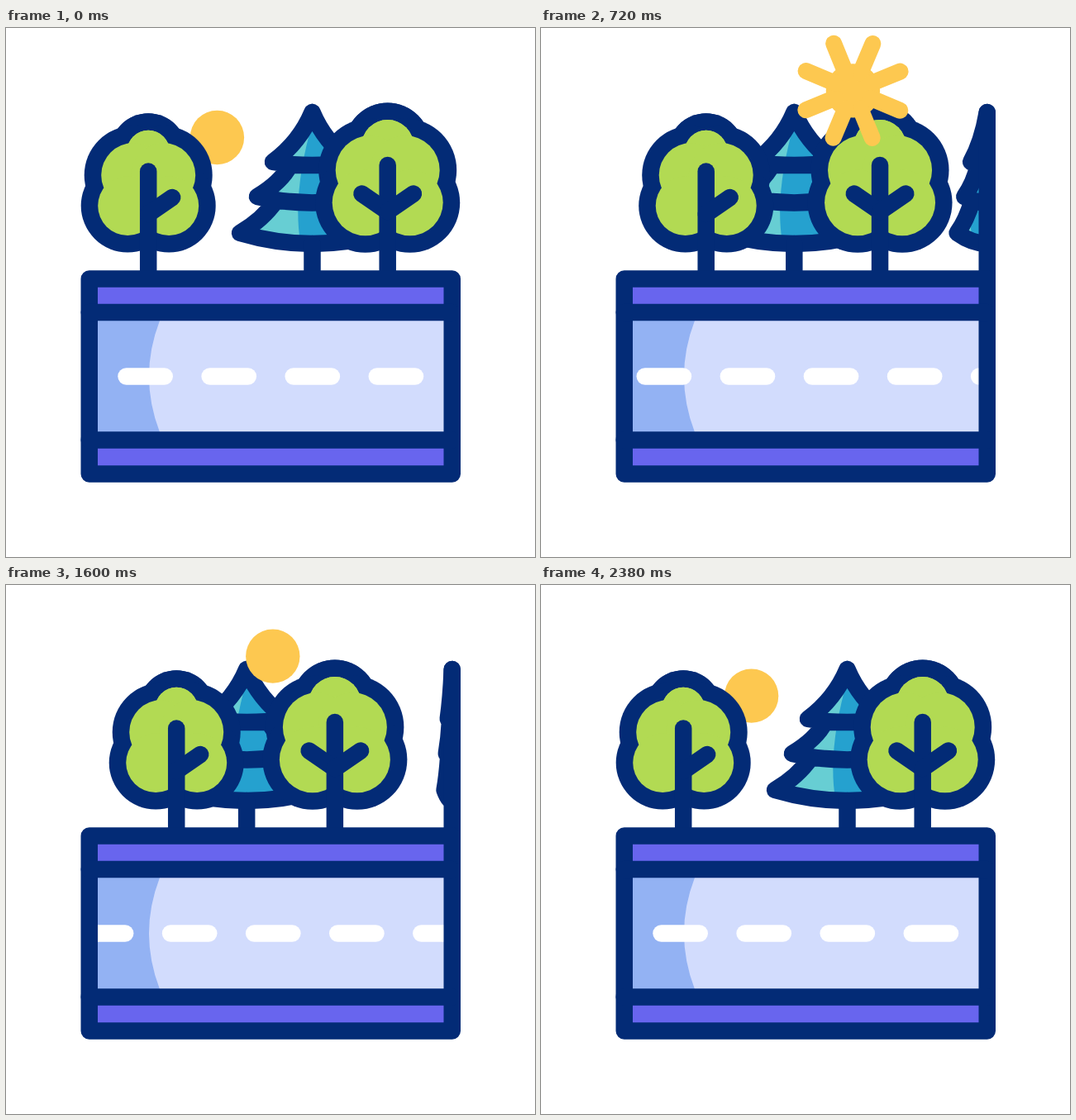
An HTML page with a canvas for the animation above (2.7 s loop, 640 px wide and 640 px high).

```html
<!DOCTYPE html>
<html lang="en">
<head>
<meta charset="utf-8">
<title>Road with trees</title>
<style>
  html, body { margin: 0; width: 100%; height: 100%; overflow: hidden; background: #fff; }
  canvas { display: block; width: 100vw; height: 100vh; }
</style>
</head>
<body>
<canvas id="stage" width="640" height="640"></canvas>
<script>
const ctx = document.getElementById('stage').getContext('2d');
const LOOP = 2700, MOVING = 2400, LINE = 20.5, BASE = 303.5;
const NAVY = '#032b76', GREEN = '#b2da53', SUN = '#fdc850', VIOLET = '#6865ee';
const TEAL = '#67ced3', BLUE = '#25a1cf', ROAD = '#d2dcfd', SHADE = '#93b2f3';

function ease(t, start, end) {
  const s = Math.min(1, Math.max(0, (t - start) / (end - start)));
  return s * s * (3 - 2 * s);
}
// Rises from 0 to 1, holds, then falls back to 0.
const swing = (t, a, b, c, d) => ease(t, a, b) - ease(t, c, d);

function stroke(color, ...points) {
  ctx.strokeStyle = color;
  ctx.beginPath();
  points.forEach(([x, y]) => ctx.lineTo(x, y));
  ctx.stroke();
}

function rect(color, x, y, w, h) {
  ctx.fillStyle = color;
  ctx.fillRect(x, y, w, h);
}

function disc(color, x, y, r) {
  ctx.fillStyle = color;
  ctx.beginPath();
  ctx.arc(x, y, r, 0, Math.PI * 2);
  ctx.fill();
}

// Lobes are [offset from trunk, y, radius], mirrored on both sides.
function leafyTree(x, lobes, trunkTop, joint, branches) {
  for (const [color, grow] of [[NAVY, LINE], [GREEN, 0]]) {
    for (const [dx, y, r] of lobes) {
      disc(color, x - dx, y, r + grow);
      disc(color, x + dx, y, r + grow);
    }
  }
  stroke(NAVY, [x, trunkTop], [x, BASE]);
  for (const [dx, y] of branches) stroke(NAVY, [x, joint], [x + dx, y]);
}

// Each tier: axis y, shoulder dx/y, curve dx/y, tip dx/y, bottom y at the axis.
const TIERS = [
  [102, 0, 102, 15, 138, 47.5, 162, 166],
  [166, 27, 166, 37, 186, 66.5, 204, 211.5],
  [211.5, 44, 209, 60, 232, 87.5, 248, 261]
];

function pineSide(path, x, k) {
  for (const [axisY, sx, sy, cx, cy, tx, ty, bottom] of TIERS) {
    path.moveTo(x, axisY);
    path.lineTo(x - sx * k, sy);
    path.quadraticCurveTo(x - cx * k, cy, x - tx * k, ty);
    path.quadraticCurveTo(x - tx * k / 2, bottom, x, bottom);
  }
}

function paintPine(path, x, shadeX) {
  ctx.fillStyle = TEAL;
  ctx.fill(path);
  ctx.save();
  ctx.clip(path);
  ctx.fillStyle = BLUE;
  ctx.beginPath();
  ctx.moveTo(shadeX, 115);
  ctx.bezierCurveTo(shadeX - 14, 165, shadeX - 22, 215, shadeX - 14, 262);
  ctx.lineTo(x + 100, 275);
  ctx.lineTo(x + 100, 100);
  ctx.fill();
  ctx.restore();
  ctx.strokeStyle = NAVY;
  ctx.stroke(path);
}

function pine(x) {
  const path = new Path2D();
  pineSide(path, x, 1);
  pineSide(path, x, -1);
  paintPine(path, x, x);
  stroke(NAVY, [x, 261], [x, BASE]);
}

function edgePine(t) {
  const x = 539.75;
  const height = swing(t, 120, 510, 1690, 1960);
  const spread = 0.955 * swing(t, 480, 1010, 1220, 1700);
  if (spread > 0) {
    const path = new Path2D();
    pineSide(path, x, spread);
    paintPine(path, x, x - 8 * spread);
  }
  if (height > 0) stroke(NAVY, [x, BASE], [x, BASE - (BASE - 102) * height]);
}

function sun(t) {
  const rise = swing(t, -239, 963, 1226, 2133) + ease(t, 2161, 3363);
  const angle = (6 + 84 * rise) * Math.PI / 180;
  const x = 400.5 - 150 * Math.cos(angle), y = 152 - 77 * Math.sin(angle);
  const outer = 23 + 41 * swing(t, 155, 817, 1240, 1580);
  const inner = Math.min(outer, 23 + 30 * swing(t, 720, 1090, 1200, 1440));
  const u = t - 380;
  const spin = (0.056 * u + 3.2e-5 * u * u) * Math.PI / 180;

  disc(SUN, x, y, 32.7);
  if (outer <= 23) return;
  ctx.lineWidth = 20;
  for (let i = 0; i < 8; i++) {
    const a = spin + i * Math.PI / 4;
    const c = Math.sin(a), s = -Math.cos(a);
    stroke(SUN, [x + c * inner, y + s * inner], [x + c * outer, y + s * outer]);
  }
  ctx.lineWidth = LINE;
}

function road(t) {
  const left = 100.75, right = 539.75;
  rect(VIOLET, left, BASE, right - left, 236);
  rect(ROAD, left, 344, right - left, 154.5);

  ctx.fillStyle = SHADE;
  ctx.beginPath();
  ctx.moveTo(left, 354);
  ctx.lineTo(186, 354);
  ctx.quadraticCurveTo(160, 421.5, 186, 489);
  ctx.lineTo(left, 489);
  ctx.fill();

  const shift = -160.5 * swing(t, 14, 1060, 1475, 2232);
  ctx.save();
  ctx.beginPath();
  ctx.rect(left, 344, right - left, 154.5);
  ctx.clip();
  for (let i = 0; i < 7; i++) {
    const x = 145.5 + i * 101.1 + shift;
    stroke('#fff', [x, 421.5], [x + 46.2, 421.5]);
  }
  ctx.restore();

  ctx.strokeStyle = NAVY;
  ctx.strokeRect(left, BASE, right - left, 236);
  for (const y of [344, 498.6]) stroke(NAVY, [left, y], [right, y]);
}

function draw(t) {
  rect('#fff', 0, 0, 640, 640);
  ctx.lineWidth = LINE;
  ctx.lineCap = ctx.lineJoin = 'round';
  const drift = swing(t, 30, 1070, 1464, 2213);

  edgePine(t);
  pine(370.5 - 87 * drift);
  leafyTree(461.7 - 70 * drift,
    [[0, 142.5, 31.5], [21, 172, 42], [27, 211.3, 40]],
    166, 222, [[-31.3, 200.5], [31.3, 200.5]]);
  sun(t);
  leafyTree(172.2 + 37.3 * drift,
    [[0, 149.8, 26], [18, 178, 39], [25, 215, 36]],
    173.5, 225, [[29, 205]]);
  road(t);
}

function tick() {
  draw(Math.min(performance.now() % LOOP, MOVING));
  requestAnimationFrame(tick);
}
tick();
</script>
</body>
</html>
```
